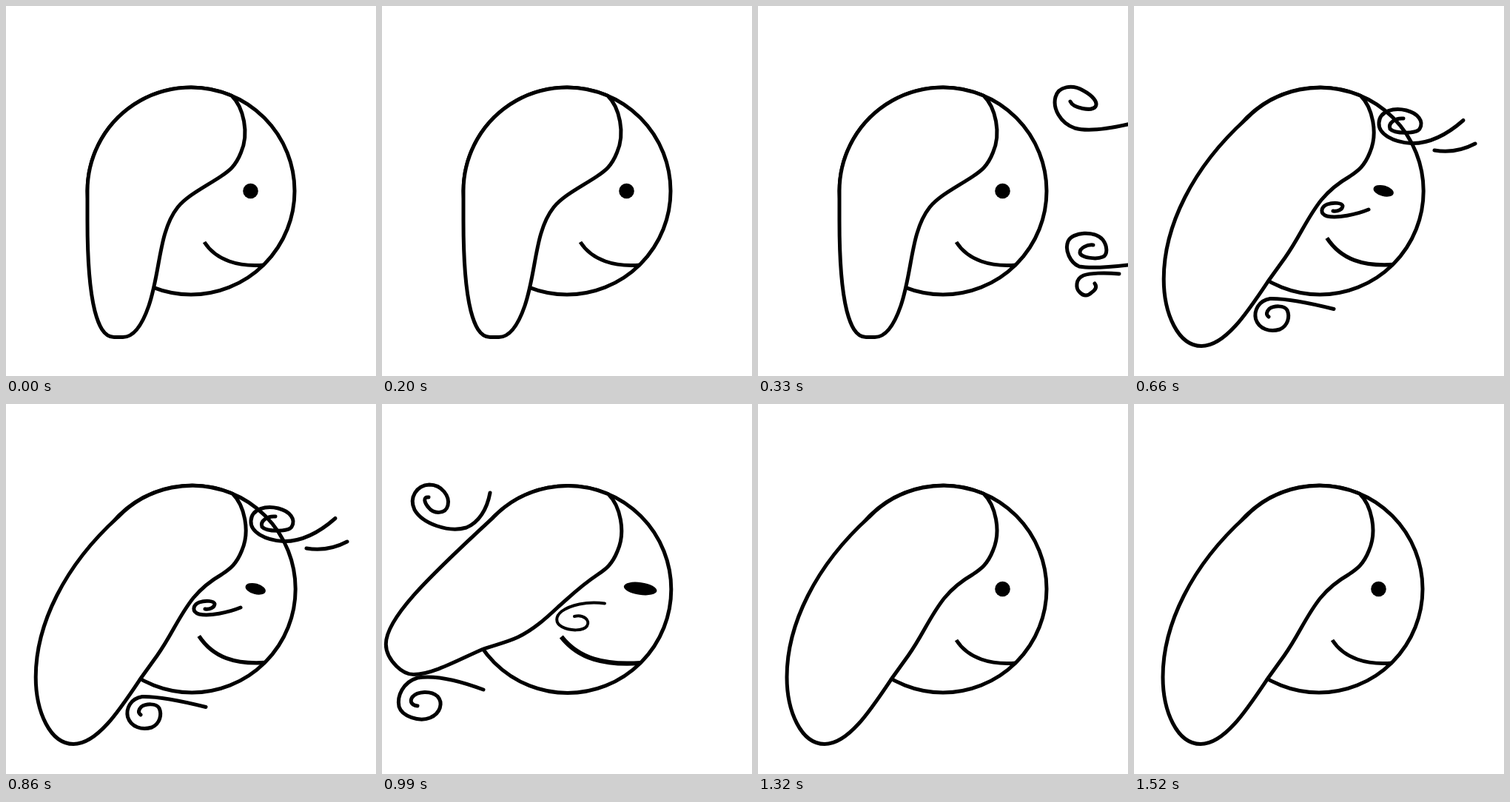
An HTML page that plays this animation: 500x500 px, repeating every 1650 ms.

```html
<!DOCTYPE html>
<html lang="en">
<head>
<meta charset="utf-8">
<title>Hair in the wind</title>
<style>
  html, body { margin: 0; width: 100%; height: 100%; overflow: hidden; background: #fff; }
  svg { display: block; width: 100vw; height: 100vh; }
  path, circle { fill: none; stroke: #000; stroke-width: 5; stroke-linejoin: round; }
  #hair { fill: #fff; }
  #eye { fill: #000; }
  #cheek { stroke-width: 4; stroke-linecap: round; }
  #wind path { stroke-linecap: round; }
</style>
</head>
<body>
<svg viewBox="0 0 500 500">
  <g id="head">
    <circle cx="250" cy="250" r="140"/>
    <path id="hair"/>
    <ellipse id="eye"/>
    <path id="mouth"/>
  </g>
  <g id="wind"></g>
  <path id="cheek"/>
</svg>
<script>
const STEP = 330;
const $ = id => document.getElementById(id);

// The fringe and the crown stay put; only the loose part of the hair swings.
const hair = loose =>
  `M305 121.25C321 137 329 172 317.500 198C310 217 301 223 290 230.500${loose}
  A140 140 0 0 1 305 121.25Z`;

const hairDown = hair(`C268 245 245 256 232 272C206 305 209 358 193 405
  C183 434 171 447.5 158 447.5H146C132 447.5 125 431 120 412
  C112 380 110 335 110 290V250`);
const hairLifted = hair(`C277 238 262 250 252 262C232 287 223 312 203 340L180 372
  C152 414 122 459.5 90 459.5C58 459.5 39 415 39 369C39 298 78 218 150 153`);
const hairBlown = hair(`C268 245 254 259 238 273C220 290 203 305 183 314.5
  C167 322 150 325.5 135 331C105 344 68 365 42 365C33 365 25 360 19 354
  C10 345 4.5 336 4.5 324C4.5 290 57 238 149.5 152.8`);

const eyeOpen = { cx: 330.5, cy: 250, rx: 10.3, ry: 10.3, tilt: 0 };
const eyeHalf = { cx: 336, cy: 249.8, rx: 14, ry: 7.2, tilt: 15 };
const eyeShut = { cx: 348.3, cy: 249, rx: 22.5, ry: 8.4, tilt: 8 };

const smile = "M268 319C284 344 315 353 349 350";
const wideSmile = "M259.5 313.5C279 343 309 352 349 349.5";
const broadSmile = "M241.5 314C265 344 300 353 349 349.5";

const gustIn = [
  `M504 159C470 167 445 170 428 165C408 158 398 138 402 123C406 108 425 106 439 114
   C452 121 460 130 456 136C451 143 426 138 422 129`,
  `M504 349.5C475 353 450 355 434 352C422 347 414 330 419 318C425 305 455 303 466 316
   C472 324 473 336 466 339C457 343 435 340 435 333C435 327 445 322 453 323`,
  `M488 362C468 360 448 361 440 364C428 369 430 382 434 386C440 393 446 392 451 387
   C457 383 458 379 455 375`
];
const gustOver = [
  `M445 154.5C424 173 400 186 375 185.500C350 184 330 173 331 158C332 141 352 137 368 141
   C384 145 392 156 386 166C382 173 352 173 346 166C343 158 353 151 364 152`,
  "M406 195C424 198 444 195 461 186",
  `M317 275C300 282 275 287 261 284C251 281 252 272 261 268C270 265 281 266 282 270
   C282 275 275 278 269 277`,
  `M270 409.5C240 402 205 395 184 395.5C168 398 162 412 164.5 423C169 437 184 441 197 437
   C208 432 211 420 207 411C203 404 189 405 183 409C179 413 178 417 182 420`
];
const gustOut = [
  `M146 120C142 142 131 160 114 167C90 174 55 162 44 143C36 126 47 110 64 109
   C81 109 92 125 89 137C86 149 70 149 63 140C57 133 55 125 63 126`,
  `M137 386C105 374 72 366 48 370C28 376 20 395 23 409C27 422 50 430 65 424
   C79 418 83 404 75 395C66 387 48 388 41 396C37 402 40 407 48 408`
];
const cheekCurl = `M301 269.5C276 266 254 272 243 280C234 287 234 296 243 301
  C254 307 272 307 277 300C282 292 272 284 260 287`;

const poses = [
  { hair: hairDown, eye: eyeOpen, mouth: smile },
  { hair: hairDown, eye: eyeOpen, mouth: smile, wind: gustIn },
  { hair: hairLifted, eye: eyeHalf, mouth: wideSmile, mouthWidth: 5.4,
    wind: gustOver, nudge: "translate(1.2 0)" },
  { hair: hairBlown, eye: eyeShut, mouth: broadSmile, mouthWidth: 6.2,
    wind: gustOut, cheek: cheekCurl, nudge: "translate(.8 .5)" },
  { hair: hairLifted, eye: eyeOpen, mouth: smile }
];

function show({ hair, eye, mouth, mouthWidth = 5, wind = [], cheek = "", nudge = "" }) {
  $("head").setAttribute("transform", nudge);
  $("hair").setAttribute("d", hair);
  $("mouth").setAttribute("d", mouth);
  $("mouth").style.strokeWidth = mouthWidth;
  for (const key of ["cx", "cy", "rx", "ry"]) $("eye").setAttribute(key, eye[key]);
  $("eye").setAttribute("transform", `rotate(${eye.tilt} ${eye.cx} ${eye.cy})`);
  $("wind").innerHTML = wind.map(d => `<path d="${d}"/>`).join("");
  $("cheek").setAttribute("d", cheek);
}

const start = performance.now();
let current = -1;

function tick() {
  const index = Math.floor((performance.now() - start) / STEP) % poses.length;
  if (index !== current) show(poses[current = index]);
  requestAnimationFrame(tick);
}
tick();
</script>
</body>
</html>
```
